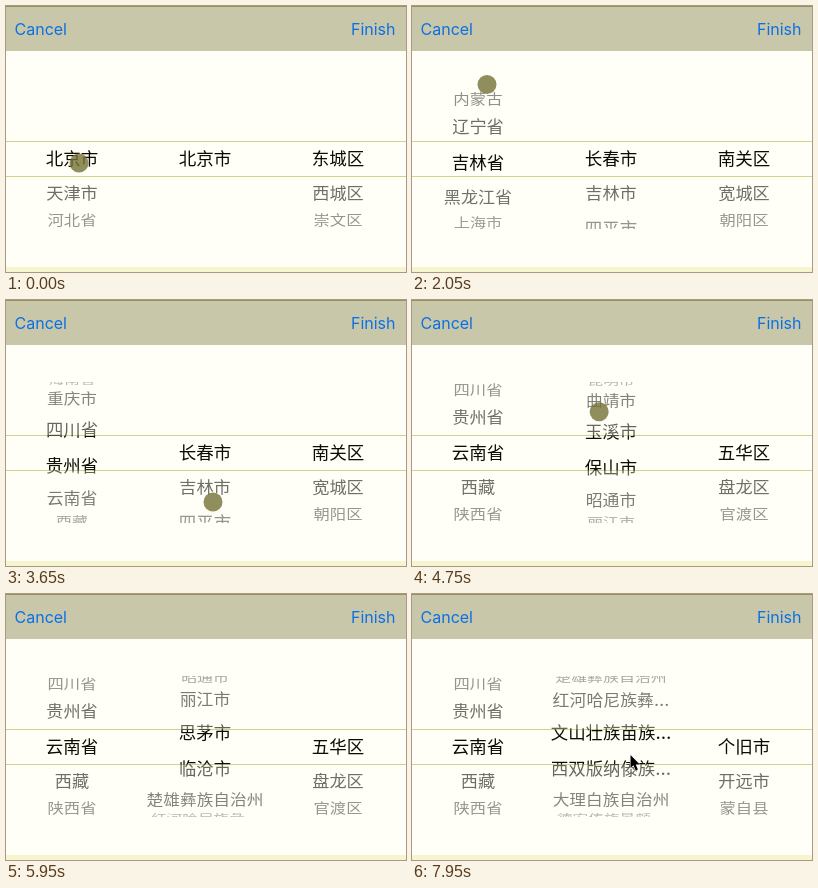
Write an HTML page with a canvas that moves like this. It is 400 px wide and 266 px high and loops after 8 s.

```html
<!DOCTYPE html>
<html lang="zh-CN">
<head>
<meta charset="utf-8">
<title>Region picker</title>
<style>
html, body { margin: 0; width: 100%; height: 100%; overflow: hidden; background: #fffff8; }
canvas { display: block; }
</style>
</head>
<body>
<canvas id="stage" width="400" height="266"></canvas>
<script>
const ctx = document.getElementById('stage').getContext('2d');
const LOOP = 8000, MID = 152.6, ROW = 35, RADIUS = 75.5, STEP = 0.482;
const TOP = 82, BOTTOM = 223, BAND_TOP = 135.5, BAND_BOTTOM = 170.5;

const words = s => s.split(' ');
const provinces = words('北京市 天津市 河北省 山西省 内蒙古 辽宁省 吉林省 黑龙江省 上海市 江苏省 浙江省 安徽省 福建省 ' +
  '江西省 山东省 河南省 湖北省 湖南省 广东省 广西 海南省 重庆市 四川省 贵州省 云南省 西藏 陕西省 甘肃省');

// Lists and the time at which each one loads
const cities = [
  { from: 0, items: ['北京市'] },
  { from: 1700, items: words('长春市 吉林市 四平市'), flatRow: 2 },
  { from: 4200, items: words('昆明市 曲靖市 玉溪市 保山市 昭通市 丽江市 思茅市 临沧市 楚雄彝族自治州 红河哈尼族彝族自治州 ' +
    '文山壮族苗族自治州 西双版纳傣族自治州 大理白族自治州 德宏傣族景颇族自治州') }
];
const districts = [
  { from: 0, items: words('东城区 西城区 崇文区') },
  { from: 1700, items: words('南关区 宽城区 朝阳区') },
  { from: 4200, items: words('五华区 盘龙区 官渡区') },
  { from: 6950, items: words('个旧市 开远市 蒙自县') }
];

// Each swipe turns the wheel by some rows and slows to a stop
const swipe = (from, to, rows) => t => {
  const u = Math.min(1, Math.max(0, (t - from) / (to - from)));
  return rows * (1 - (1 - u) ** 1.8);
};
const wheelOf = (...swipes) => t => swipes.reduce((sum, s) => sum + s(t), 0);

const provinceAt = wheelOf(swipe(50, 400, 2), swipe(650, 1700, 3.87), swipe(2050, 4150, 18.13));
const cityAt = wheelOf(swipe(4550, 5200, 5.3), swipe(5750, 6900, 3.7), swipe(7150, 8300, 1.55));

// A finger follows the wheel it drags; slant is its sideways drift
const touches = [
  { from: 0, to: 750, x: 73, y: 157, wheel: provinceAt, slant: 0 },
  { from: 2050, to: 2100, x: 75, y: 79, wheel: provinceAt, slant: 0 },
  { from: 2300, to: 2500, x: 75, y: 200, wheel: provinceAt, slant: 0 },
  { from: 3600, to: 4850, x: 207, y: 202, wheel: cityAt, slant: 0.22 },
  { from: 5700, to: 5900, x: 207, y: 202, wheel: cityAt, slant: 0.22 },
  { from: 7050, to: 7600, x: 208, y: 202, wheel: cityAt, slant: 0 }
];

const loaded = (lists, t) => lists.filter(l => l.from <= t).pop();
const shorten = s => s.length > 7 ? s.slice(0, 6) + '…' : s;

function rect(color, x, y, w, h) {
  ctx.fillStyle = color;
  ctx.fillRect(x, y, w, h);
}

function clipped(y0, y1, draw) {
  ctx.save();
  ctx.beginPath();
  ctx.rect(0, y0, 400, y1 - y0);
  ctx.clip();
  draw();
  ctx.restore();
}

function label(text, x, y, sx, sy, alpha) {
  ctx.save();
  ctx.translate(x, y);
  ctx.scale(sx, sy);
  ctx.fillStyle = `rgba(12,12,0,${alpha})`;
  ctx.fillText(text, 0, 6);
  ctx.restore();
}

function wheel({ items, flatRow }, pos, x) {
  ctx.font = '500 17.5px Inter, "Noto Sans CJK SC", "Noto Sans CJK", sans-serif';
  ctx.textAlign = 'center';
  items.forEach((item, i) => {
    const d = i - pos, angle = d * STEP;
    if (Math.abs(angle) > 1.45) return;
    const c = Math.cos(angle), flat = i === flatRow;
    const y = MID + (flat ? d * ROW : RADIUS * Math.sin(angle));
    const sx = flat ? 1 : 1 / (1 + 0.17 * (1 - c));
    const sy = flat ? 1 : sx * c ** 0.35;
    const draw = alpha => () => label(shorten(item), x, y, sx, sy, alpha);
    const faded = draw(0.15 + 0.5 * c);
    clipped(TOP, BAND_TOP, faded);
    clipped(BAND_TOP, BAND_BOTTOM, draw(1));
    clipped(BAND_BOTTOM, BOTTOM, faded);
  });
}

function toolbar() {
  rect('#c9c7a9', 0, 0, 400, 45);
  rect('#96945a', 0, 0, 400, 1);
  ctx.font = '16px Inter, "Liberation Sans", sans-serif';
  ctx.fillStyle = '#0b70e4';
  ctx.textAlign = 'left';
  ctx.fillText('Cancel', 8.5, 29);
  ctx.textAlign = 'right';
  ctx.fillText('Finish', 389.5, 29);
}

function finger(t) {
  const touch = touches.find(p => t >= p.from && t < p.to);
  if (!touch) return;
  const travel = ROW * (touch.wheel(t) - touch.wheel(touch.from));
  ctx.fillStyle = 'rgba(116,114,54,.8)';
  ctx.beginPath();
  ctx.arc(touch.x - travel * touch.slant, touch.y - travel, 9.5, 0, 7);
  ctx.fill();
}

function pointer(x, y) {
  ctx.save();
  ctx.translate(x, y);
  const arrow = new Path2D('M0 0V13L3 10.3L5.2 15.4L7.4 14.4L5.2 9.5H9.3Z');
  ctx.strokeStyle = '#fff';
  ctx.stroke(arrow);
  ctx.fillStyle = '#000';
  ctx.fill(arrow);
  ctx.restore();
}

function render(t) {
  rect('#fffff8', 0, 0, 400, 266);
  rect('#f6f5cf', 0, 261, 400, 5);
  toolbar();
  rect('#d3d28c', 0, 135, 400, 1);
  rect('#d3d28c', 0, 170, 400, 1);
  wheel({ items: provinces }, provinceAt(t), 66);
  wheel(loaded(cities, t), cityAt(t), 199);
  wheel(loaded(districts, t), 0, 332);
  finger(t);
  if (t >= 7950) pointer(218.5, 161);
}

const start = performance.now();
function tick() {
  render((performance.now() - start) % LOOP);
  requestAnimationFrame(tick);
}
tick();
</script>
</body>
</html>
```
